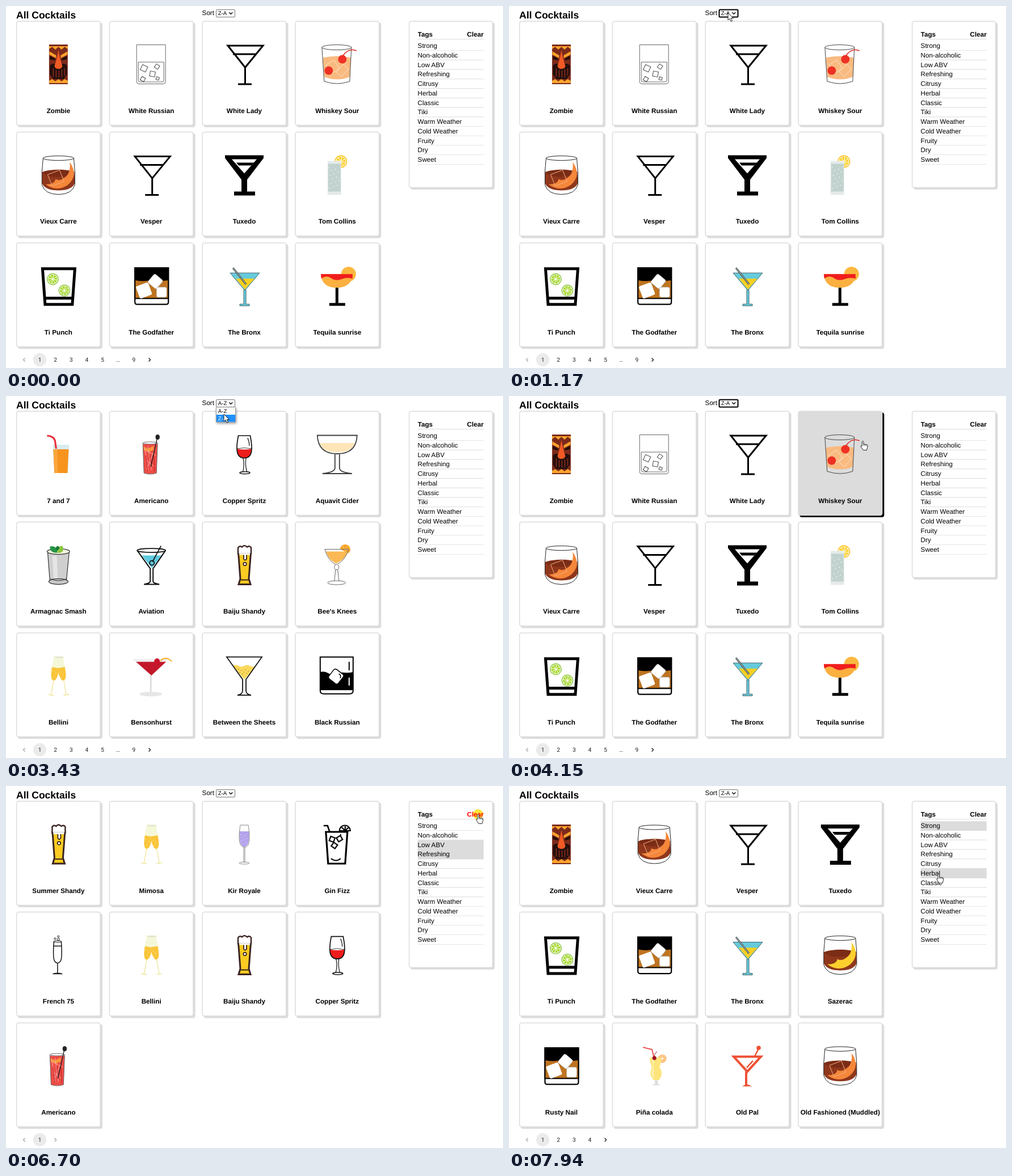
An HTML page for the animation above (8 s loop, 876 by 639 pixels).

```html
<!DOCTYPE html>
<html lang="en">
<head>
<meta charset="utf-8">
<title>All Cocktails</title>
<style>
html, body { margin: 0; width: 100%; height: 100%; overflow: hidden; background: #fff; }
svg { display: block; width: 876px; height: 639px; font: 11.68px "Liberation Sans", Arial, sans-serif; text-rendering: geometricPrecision; }
.bold { font-weight: bold; }
.mid { text-anchor: middle; }
.small { font-size: 9.7px; }
.page { font: 10.2px Roboto, sans-serif; text-anchor: middle; fill: #212121; }
.face { fill: #fff; stroke: #dcdcdc; stroke-width: 1.5; }
.shade { fill: #dcdcdc; }
.hover .face { fill: #dcdcdc; }
.hover .shade { fill: #000; }
#click { mix-blend-mode: multiply; }
</style>
</head>
<body>
<svg id="stage" viewBox="0 0 876 639"></svg>
<script>
const LOOP = 8000;
const stage = document.getElementById('stage');

// Drawing helpers
const line = (d, stroke = '#000', w = 1.5, fill = 'none') =>
  `<path d="${d}" stroke="${stroke}" stroke-width="${w}" fill="${fill}"/>`;
const fill = (d, color) => `<path d="${d}" fill="${color}"/>`;
const oval = (x, y, rx, ry, color, stroke = 'none', w = 1) =>
  `<ellipse cx="${x}" cy="${y}" rx="${rx}" ry="${ry}" fill="${color}" stroke="${stroke}" stroke-width="${w}"/>`;
const dot = (x, y, r, color, stroke, w) => oval(x, y, r, r, color, stroke, w);
const cube = (x, y, size, turn, color = '#fff', stroke = 'none', w = 1, round = 0) =>
  `<rect x="${-size / 2}" y="${-size / 2}" width="${size}" height="${size}" rx="${round}" fill="${color}"
    stroke="${stroke}" stroke-width="${w}" transform="translate(${x} ${y}) rotate(${turn})"/>`;
const text = (x, y, str, cls = '', extra = '') => `<text x="${x}" y="${y}" class="${cls}" ${extra}>${str}</text>`;
const group = (inner, attrs) => `<g ${attrs}>${inner}</g>`;

function citrus(x, y, r, rim, flesh) {
  let spokes = '';
  for (let i = 0; i < 4; i++) {
    const a = i * Math.PI / 4 + .2, dx = r * .8 * Math.cos(a), dy = r * .8 * Math.sin(a);
    spokes += `M${x - dx} ${y - dy}L${x + dx} ${y + dy}`;
  }
  return dot(x, y, r, rim) + dot(x, y, r * .86, '#fff') + dot(x, y, r * .76, flesh) + line(spokes, '#fff', 1);
}

function bubbles(n, x, y, w, h, color) {
  let out = '';
  for (let i = 0; i < n; i++) out += dot(x + i * .618 % 1 * w, y + (i + .5) / n * h, .8, color);
  return out;
}

// Glass families
const martini = line('M-29-33h62L1.5 5.5zM-20-18h41M1.5 5v30M-11 35h24', '#000', 3);

const rocks = (swirl, ice) =>
  fill('M-29-5Q-20-10 0-9T28-6L29 14Q24 27 0 27T-29 14z', '#8f371c') +
  fill('M-29-5Q0-14 28-6Q20 2 0 3T-29-5z', '#7b2c16') +
  fill('M20-23Q36 0 17 17Q-3 31-23 16Q-7 17-5 7Q3 12 14 2Q22-6 20-23z', swirl) +
  (ice ? line('M-19-1l21-8 8 20-21 8z', '#f4b183', 1) : '') +
  oval(0, -30, 27, 4, 'none', '#222') +
  line('M-27-30Q-30-5-29 17Q-24 34 0 34T29 17Q30-5 27-30', '#222', 1);

const wine = color =>
  fill('M-13-10Q0-7 13-10C13 1 8 6 0 6S-13 1-13-10z', color) +
  line('M-10.5-33C-15-10-15 6.5 0 6.5S15-10 10.5-33z', '#111', 1.7) +
  line('M-13-10Q0-13 13-10', '#111', .8) + line('M6-29q3 7 3 14', '#111', 1.3) +
  line('M-2 7q3 12-1 25M3 7q-2 12 2 25', '#111', 1.2) + oval(1, 32.5, 9, 2, '#fff', '#111', 1.5);

const toastGlass = fill('M-6-35H7V-14Q7 7 1 8T-6-14z', '#f5f8d8') +
  fill('M-6-15H7V-10Q7 7 1 8T-6-10z', '#f9c53b') + line('M1 8v26', '#efe7a0', 1.4) + line('M-4 34h10', '#efe7a0', 1.6);
const toast = group(toastGlass, 'transform="translate(-8 0) rotate(10)"') +
  group(toastGlass, 'transform="translate(7 0) rotate(-10)"') + oval(1, -33, 9, 1.5, '#e2e6d2') +
  bubbles(7, -10, -10, 21, 14, '#fde59a');

const beer = line('M-10.5-22h22L8 24l3 10H-10l3-10z', '#3b2420', 3, '#fbcb22') +
  line('M-11-20v-11q3-4 7-1 4-5 9 0 5-3 7 1v11z', '#3b2420', 2.4, '#fff') +
  fill('M-9-21H10v3H4v7q-3 4-5 0v-7h-8z', '#fff') +
  line('M-1-18v7q2 4 5 0v-7', '#3b2420', 1.8) + dot(1, -2, 2.8, '#fff', '#3b2420', 1.8) +
  line('M-6 26H7', '#3b2420', 2);

const flute = line('M-8-24h13Q7 4 4 10Q-2 18-7 10Q-10 4-8-24zM-8-16h13M-1.5 14v18', '#111', 1.5) +
  line('M-10 33q8-3 17 0z', '#111', 1.3) + oval(-1.5, -24, 6.5, 1.5, '#fff', '#111') +
  dot(-6, -29, 1.6, 'none', '#111') + dot(0, -28, 2, 'none', '#111') + dot(0, -33, 1.5, 'none', '#111');

const icons = {
  martini, toast, beer, flute,
  old: rocks('#f5873a', true),
  sazerac: rocks('#fbd02d', false),
  red: wine('#ee1c1c'),
  violet: wine('#b09df0'),
  tiki: fill('M-16.5-35h33v70h-33z', '#7c2a1b') +
    fill('M-16.5-32h33v5l-5.5-4-5.5 5-5.5-5-5.5 5-5.5-5-5.5 4z', '#fba52d') +
    fill('M-16-23l12 7v5l-12-6zM16-23l-12 7v5l12-6z', '#f9a02c') +
    fill('M-15-15l9 5v3l-9-2zM15-15l-9 5v3l9-2z', '#220d09') +
    fill('M-15 2q7-8 15 3 8-11 15-3v16l-6 8h-18l-6-8z', '#24100d') +
    line('M-9 7v15M-4 10v13M1 11v12M6 9v14M11 7v13', '#8f2d1d', 1.5) +
    fill('M0-25Q-3-8-7 3Q-6 8 0 8T7 3Q3-8 0-25z', '#f15a24') +
    fill('M-16.5 33v-4l5.5-3 5.5 4 5.5-4 5.5 4 5.5-4 5.5 3v4z', '#fba52d'),
  white: line('M-26-34.5h51v65q0 4-4 4h-43q-4 0-4-4zM-23-4h45v32q0 3-3 3h-39q-3 0-3-3z', '#666', 1) +
    cube(-13, 7, 10, 25, '#fff', '#444') + cube(10, 4, 7, 35, '#fff', '#444') + cube(2, 17, 9, 10, '#fff', '#444') +
    cube(-15, 26, 7, 30, '#fff', '#444') + cube(11, 25, 5, 15, '#fff', '#444'),
  sour: fill('M-25-12Q0-17 24-12L22 22Q0 31-23 22z', '#f9ba80') +
    line('M-20 1l14-9 10 15-14 9zM-2 13l13-13 9 8-13 14z', '#fbe2c8', 1) +
    line('M-27-30l4 60Q0 38 22 30l3-60', '#444', 1) + oval(-1, -30, 26, 4.5, 'none', '#444') +
    line('M10-15Q20-30 34-24', '#d92b20', 1.5) + dot(9, -9, 7.5, '#ee3124') + dot(-15, 11, 7.5, '#ee3124'),
  tuxedo: fill('M-34-35h68v5L5 8v21h14v7h-37v-7h13V8L-34-30z', '#000') + fill('M-22-28h44L0-3z', '#fff') +
    fill('M-14-22h31l-5 5h-22z', '#000'),
  collins: citrus(6.5, -24, 11, '#fbc31f', '#fcd02f') + fill('M-17-25h24v60h-24z', '#e5ebea') +
    fill('M-16-20h22v49h-22z', '#c2d3cf') + bubbles(14, -14, -15, 18, 40, '#fff'),
  punch: line('M-28-30.5h57L24.5 32.5h-48z', '#000', 5, '#fff') + fill('M-25 19h50v5h-50z', '#000') +
    citrus(-10, -12, 10.5, '#8cc63f', '#a9d92f') + citrus(10.5, 8, 10.5, '#8cc63f', '#a9d92f'),
  dark: line('M-29-31.5h59v60q0 4-4 4h-51q-4 0-4-4z', '#000', 2.2, '#fff') + fill('M-30-33h61v56h-61z', '#000') +
    fill('M-28-10q10 2 18 1t16 0 23-1v31h-57z', '#bf7420') +
    cube(-13, 8, 23, -20, '#fff', 'none', 0, 3) + cube(7, -8, 20, 40, '#fff', '#999', .6, 3) +
    cube(18, 11, 18, 0, '#fff', '#999', .6, 3),
  bronx: line('M-25-23h52L1 8z', '#43656b', 1, '#66cbdc') + fill('M-15-13h33L1 6z', '#f7cf21') +
    line('M-1 7h4v25h6v3H-8v-3h7z', '#43656b', 1, '#66cbdc') + line('M-20-32L3-3', '#444', 3) + line('M-20-32L3-3', '#cceef2', 1),
  sunrise: dot(20, -21, 13, '#fbb83f') + fill('M-29-21h57Q25 3-1 3T-29-21z', '#fbb040') +
    fill('M-29-21h56v8q-10-3-20 1t-18-2-17 1z', '#f01d1d') + fill('M-3 3h5v27h12v5h-28v-5h11z', '#000'),
  juice: fill('M-10-17h29l-2 50h-25z', '#d9ecef') + fill('M-9-9h27l-2 42h-23z', '#f7941e') +
    fill('M-9-9h7l1 42h-6z', '#fba63c') + line('M-20-33q12 1 14 9l2 14', '#e8323f', 3.2),
  tall: fill('M-15-18h26L9 33Q-2 36-13 33z', '#ee4c46') + fill('M-14-14l8 4 10-5v7l-8 4-9-3z', '#f79a3c') +
    line('M-12-12l7 42M-6-14L0 28M7-12L-8 26M8 2l-17-8M-10 10l16 12', '#f9a6a0', 1) +
    line('M-10 2l4 28M4-6l2 36M-3 0l3 20', '#bd1f24', 1) +
    line('M-15-20l2 53q11 4 22 0l2-53', '#666', 1) + oval(-2, -20, 13, 2, 'none', '#666') +
    line('M10-27L-1 22', '#222', 1.4) + oval(11, -30.5, 3.7, 4.5, '#222'),
  coupe: fill('M-31-20h62C26-6 14-4 0-4S-26-6-31-20z', '#fde5b8') +
    line('M-35-33.5h70C34-8 18-1 0-1S-34-8-35-33.5zM-4 0v25q-2 7-22 9h52q-20-2-22-9V0', '#3d3d3d', 1.8),
  julep: line('M-19-24l4 52Q0 33 14 28l5-52z', '#333', 1.2, '#cfcfcf') + fill('M-11-16l3 42h7l-2-42z', '#e5e5e5') +
    oval(0, 29, 17, 5, '#c9c9c9', '#333', 1.2) + line('M-14 24Q0 31 14 24', '#333', 1) +
    oval(0, -24, 20, 5, '#f1f4df', '#333', 1.2) +
    fill('M-2-22q-13 1-13-11 13-2 13 11z', '#249447') + fill('M-1-21q-5-12 8-13 6 11-8 13z', '#8cc63f') + fill('M-3-25q-4-7 2-9 6 4-2 9z', '#167a38'),
  aviation: fill('M-17-17h35L1 5z', '#5ec9de') + oval(0, -26, 25, 3.5, 'none', '#111', 1.8) +
    line('M-25-26L-2 6v23q-1 3-11 5h27Q4 32 3 29V6L25-26', '#111', 2) + line('M17-34L2-6', '#111', 1.8) + dot(1, -4, 4, 'none', '#111', 1.8),
  bees: fill('M5-28a9 9 0 1 1 15 7z', '#f9a52a') + line('M13-27l-3-7M13-27l5-6M13-27l8 0', '#fdc672', 1) +
    fill('M-20-24h40Q12-8-2-3-14-8-20-24z', '#fbb955') +
    line('M-22-28h42Q13-6-2-1-16-7-22-28zM-3-1q-4 5 0 9l-2 20M1-1q4 5 0 9l2 20M-3 8h4', '#666', 1) + oval(-1, 31, 16, 3.5, 'none', '#666'),
  benson: fill('M-33-30h62L1 1z', '#eeeeee') + fill('M-27-25h53L0-1z', '#c3182b') + line('M-1-1v29', '#dedede', 3) + oval(-1, 32, 20, 4, '#e6e6e6') +
    dot(10, -26, 5, '#c9142a') + line('M16-27q9-9 20 1', '#f7a823', 2),
  sheets: fill('M-20-18q5-3 10 0t10 0 10 0 11 0L0 6z', '#fbd95c') + bubbles(9, -10, -13, 20, 12, '#9c7b12') +
    line('M-31-33.5h62L3 6v20q0 6 9 8h-24q9-2 9-8V6z', '#111', 1.8),
  black: line('M-30-33.5h58v59q0 6-6 6h-46q-6 0-6-6z', '#000', 2, '#fff') +
    fill('M-30-7q8-2 14 2t13 1 15-2 16-1v32h-58z', '#000') +
    line('M21-25v15', '#000', 2) + line('M21 3v14', '#fff', 2) +
    cube(-2, 1, 21, 38, '#fff', '#000', 1.5, 4) + line('M3-4q5 4 2 8', '#000', 1.5),
  fizz: line('M-20-22h38l-4 56h-30z', '#000', 3.2, '#fff') + line('M-24-33h7l4 12', '#000', 2.6) +
    line('M4-24a9.5 9.5 0 0 1 19 0zM14-24v-8M14-24l6-6M14-24l-6-6', '#000', 2.2, '#fff') +
    cube(-9, -9, 8, 20, '#fff', '#000', 2.2) + cube(4, -10, 8, -30, '#fff', '#000', 2.2) + cube(-5, 2, 8, 35, '#fff', '#000', 2.2) +
    line('M-11 25q9 7 17 0', '#000', 2) + line('M6-18v3', '#000', 2),
  royale: fill('M-8.5-23H8.5C9-6 7 4 0 4S-9-6-8.5-23z', '#b5a2ec') + bubbles(8, -6, -18, 12, 18, '#e2dafb') +
    line('M-7-34C-11-8-9 4 0 5S11-8 7-34zM-1 5v27M1 5v27', '#888', 1) + oval(0, 33, 9, 1.8, 'none', '#888'),
  pina: citrus(14, -13, 7, '#f7941e', '#fba63c') + line('M-20-33l16 4 4 18', '#e5322d', 1.6) +
    fill('M-8-15h20Q12-5 9 2Q17 14 8 25H-1Q-11 14-4 2Q-8-5-8-15z', '#fde57c') +
    fill('M-4-13h4Q-3 6 0 23Q-8 12-2 2z', '#fff3b8') + fill('M1 25h5v6l5 3H-4l5-3z', '#ddd') +
    line('M0-15q0-8 5-10', '#8f1f1f', 1) + dot(0, -14, 3.5, '#a3131b'),
  pal: line('M-24-16.5h48L0 10z', '#ee5135', 4) + line('M-2 10v24', '#ee5135', 4) + fill('M-9 36q8-7 17 0z', '#ee5135') +
    line('M13-17l7-14M-1 3L10-9', '#ee5135', 2.5) + dot(20, -32, 3.8, '#ee5135'),
};

// Each entry is "icon:Name"
const scenes = {
  za: {
    pages: '12345…9',
    list: `tiki:Zombie|white:White Russian|martini:White Lady|sour:Whiskey Sour|old:Vieux Carre|martini:Vesper|tuxedo:Tuxedo|collins:Tom Collins|punch:Ti Punch|dark:The Godfather|bronx:The Bronx|sunrise:Tequila sunrise`,
  },
  az: {
    pages: '12345…9',
    list: `juice:7 and 7|tall:Americano|red:Copper Spritz|coupe:Aquavit Cider|julep:Armagnac Smash|aviation:Aviation|beer:Baiju Shandy|bees:Bee's Knees|toast:Bellini|benson:Bensonhurst|sheets:Between the Sheets|black:Black Russian`,
  },
  low: {
    pages: '1',
    list: `beer:Summer Shandy|toast:Mimosa|violet:Kir|fizz:Gin Fizz|flute:French 75|flute:Champagne Cocktail|toast:Bellini|beer:Baiju Shandy|red:Copper Spritz|tall:Americano`,
  },
  fresh: {
    pages: '1',
    list: `beer:Summer Shandy|toast:Mimosa|royale:Kir Royale|fizz:Gin Fizz|flute:French 75|toast:Bellini|beer:Baiju Shandy|red:Copper Spritz|tall:Americano`,
  },
  strong: {
    pages: '1234',
    list: `tiki:Zombie|old:Vieux Carre|martini:Vesper|tuxedo:Tuxedo|punch:Ti Punch|dark:The Godfather|bronx:The Bronx|sazerac:Sazerac|dark:Rusty Nail|pina:Piña colada|pal:Old Pal|old:Old Fashioned (Muddled)`,
  },
};

const cardX = i => 18.6 + i % 4 * 163.8;
const cardY = i => 27 + Math.floor(i / 4) * 195.6;
const panel = (x, y, w, h) =>
  `<rect class="shade" x="${x + 2.2}" y="${y + 2.2}" width="${w + 1.5}" height="${h + 1.5}" rx="4"/>
   <rect class="face" x="${x}" y="${y}" width="${w}" height="${h}" rx="3.5"/>`;

function card(entry, i) {
  const [icon, name] = entry.split(':'), x = cardX(i), y = cardY(i);
  return group(panel(x, y, 147.6, 183.4) +
    group(icons[icon], `transform="translate(${x + 73.8} ${y + 76})"`) +
    text(x + 73.8, y + 161.7, name, 'bold mid'), 'class="card"');
}

function pager(pages) {
  const chevron = (x, dir, on) =>
    line(`M${x - 1.5 * dir} 621.4L${x + 1.5 * dir} 624.4 ${x - 1.5 * dir} 627.4`, on ? '#222' : '#a5a5a5', 1.4);
  const pageX = i => 59.5 + i * 27.65;
  return dot(59.5, 624.4, 11.7, '#ebebeb') + chevron(32, -1, false) +
    [...pages].map((p, i) => text(pageX(i), 628, p, 'page')).join('') +
    chevron(pageX(pages.length), 1, pages.length > 1);
}

const tags = ['Strong', 'Non-alcoholic', 'Low ABV', 'Refreshing', 'Citrusy', 'Herbal', 'Classic', 'Tiki',
  'Warm Weather', 'Cold Weather', 'Fruity', 'Dry', 'Sweet'];
const ROW = 16.73, tagY = i => 62.3 + i * ROW;

const tagPanel = panel(710.6, 27, 147, 293.4) + text(725.7, 53.7, 'Tags', 'bold') +
  text(812.5, 53.7, 'Clear', 'bold', 'id="clear"') + fill('M725.6 58h116.2v.9h-116.2z', '#dcdcdc') +
  tags.map((tag, i) => `<rect class="tag" x="725.6" y="${tagY(i)}" width="116.2" height="${ROW}" fill="#dcdcdc"/>` +
    fill(`M725.6 ${tagY(i) + ROW - .9}h116.2v.9h-116.2z`, '#dcdcdc') + text(725.6, tagY(i) + 12, tag)).join('');

const select = text(345.6, 16, 'Sort') +
  '<rect id="box" x="370.5" y="6.5" width="33" height="13" rx="1.5" fill="#fff"/>' +
  text(373.7, 16.4, '', 'small', 'id="value"') + line('M393.3 11.2l3 3 3-3', '#111', 1.6);

const option = (y, label) => `<rect class="option" x="371" y="${y}" width="33" height="12.6"/>` +
  text(373.7, y + 9.5, label, 'small choice');
const popup = group('<rect x="370.5" y="20" width="34" height="26" fill="#fff" stroke="#999" style="filter:drop-shadow(1px 2px 2px #0006)"/>' +
  option(20.2, 'A-Z') + option(33, 'Z-A'), 'id="popup"');

const arrow = group(line('M0 0v13l3-2.7 2.2 5 2.3-1-2.2-4.8h4z', '#222', 1, '#fff'), 'id="arrow"');
const hand = group(line('M-1 1.2q1.4-2 2.6 0v5l1.3-.5 1.5.6 1.5-.2 1.3.8 1.4.5v4l-1.5 5h-6l-4.4-6.7q.3-1.9 2.3-.6z', '#222', 1, '#fff') +
  line('M2 9v-3M4.4 9v-2.5M6.6 9.2v-2', '#222', .8), 'id="hand"');

stage.innerHTML = text(18, 21.8, 'All Cocktails', 'bold', 'font-size="17.52"') +
  Object.entries(scenes).map(([key, s]) =>
    group(s.list.split('|').map(card).join('') + pager(s.pages), `id="scene-${key}"`)).join('') +
  tagPanel + select + popup +
  group(dot(0, 0, 9, '#ffe63a'), 'id="click"') + group(arrow + hand, 'id="cursor"');

const $ = id => document.getElementById(id);
const all = sel => [...stage.querySelectorAll(sel)];
const show = (el, on) => el.setAttribute('display', on ? 'inline' : 'none');
const tagRects = all('.tag'), options = all('.option'), choices = all('.choice');
for (const key in scenes) {
  scenes[key].node = $('scene-' + key);
  scenes[key].cards = [...scenes[key].node.querySelectorAll('.card')];
}

// Timeline
const moves = [[70, 787, 596], [300, 490, 160], [850, 386, 12], [1300, 386, 12], [1500, 384, 25], [2110, 384, 25],
  [2400, 385, 11], [2900, 385, 11], [3050, 384, 32], [3830, 384, 32], [4280, 749, 104], [4980, 749, 104],
  [5020, 751, 106], [5130, 751, 106], [5210, 747, 118], [6140, 747, 118], [6600, 832, 50], [6780, 832, 50],
  [6930, 752, 69], [7010, 752, 69], [7170, 745, 66], [7560, 745, 66], [7870, 757, 155], [8000, 757, 155]];
const cuts = [[0, 'za'], [1880, 'az'], [3510, 'za'], [4660, 'low'], [5590, 'fresh'], [6760, 'za'], [7560, 'strong']];
const clicks = [[1080, 1160], [1790, 1880], [2500, 2580], [3370, 3430], [4430, 4510], [5450, 5590], [6640, 6760], [7480, 7560]];
const within = (t, a, b) => t >= a && t < b;

function pointer(t) {
  const k = Math.max(1, moves.findIndex(m => m[0] > t));
  const [t0, x0, y0] = moves[k - 1], [t1, x1, y1] = moves[k];
  const f = Math.max(0, (t - t0) / (t1 - t0));
  return [x0 + (x1 - x0) * f, y0 + (y1 - y0) * f];
}

function render(t) {
  const [x, y] = pointer(Math.floor(t / 75) * 75);
  const current = cuts.filter(c => c[0] <= t).pop()[1];
  const open = within(t, 1230, 1880) || within(t, 2580, 3510);
  const active = t >= 70 && !open && !within(t, 3510, 3830);

  let over = false;
  for (const key in scenes) {
    const { node, cards } = scenes[key];
    show(node, key === current);
    if (key !== current) continue;
    cards.forEach((el, i) => {
      const hit = active && within(x, cardX(i), cardX(i) + 148) && within(y, cardY(i), cardY(i) + 184);
      el.classList.toggle('hover', hit);
      over = over || hit;
    });
  }

  const picked = [within(t, 4510, 6760) && 2, within(t, 5520, 6760) && 3, t >= 7480 && 0];
  tagRects.forEach((el, i) => {
    const hit = active && within(x, 725.6, 842) && within(y, tagY(i), tagY(i) + ROW);
    show(el, hit || picked.includes(i));
    over = over || hit;
  });
  const onClear = active && within(x, 812, 842) && within(y, 42, 58);
  $('clear').setAttribute('fill', onClear ? '#f00' : '#000');

  const focused = within(t, 1080, 4660) && !open;
  $('box').setAttribute('stroke', focused ? '#000' : '#767676');
  $('box').setAttribute('stroke-width', focused ? 2 : 1);
  $('value').textContent = within(t, 1880, 3510) ? 'A-Z' : 'Z-A';
  show($('popup'), open);
  const lit = within(t, 1430, 2980) ? 0 : 1;
  options.forEach((el, i) => el.setAttribute('fill', i === lit ? '#1e90ff' : '#fff'));
  choices.forEach((el, i) => el.setAttribute('fill', i === lit ? '#fff' : '#000'));

  const place = `translate(${x} ${y})`;
  $('cursor').setAttribute('transform', place);
  $('click').setAttribute('transform', place);
  show($('cursor'), t >= 70);
  show($('click'), clicks.some(([a, b]) => within(t, a, b)));
  show($('hand'), over || onClear);
  show($('arrow'), !over && !onClear);
}

const start = performance.now();
function tick() {
  render((performance.now() - start) % LOOP);
  requestAnimationFrame(tick);
}
tick();
</script>
</body>
</html>
```
